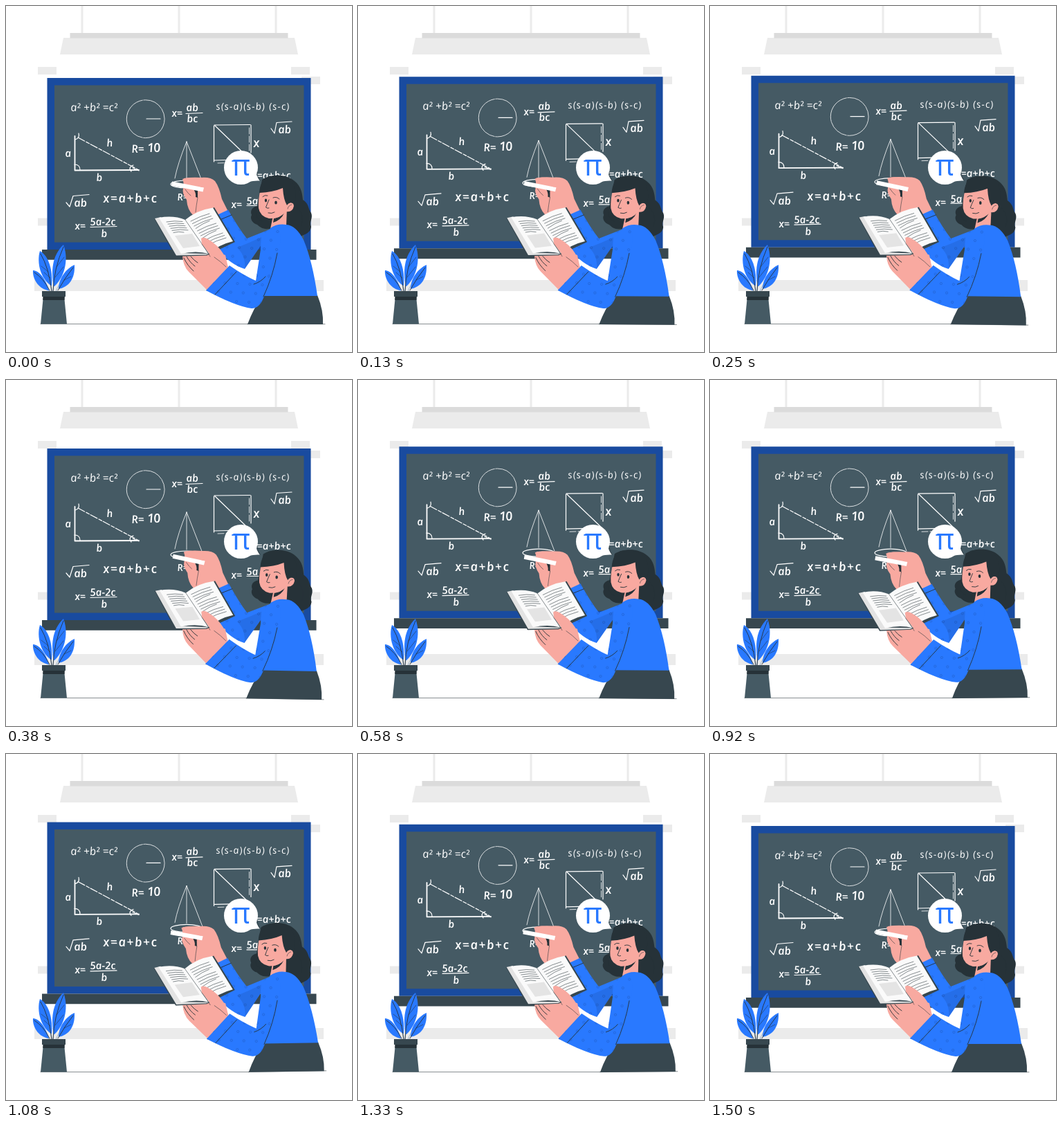
Animation, 500 px wide and 500 px high, one loop 1.54 s. Source, as an HTML page:

```html
<!DOCTYPE html>
<html lang="en">
<head>
<meta charset="utf-8">
<title>Maths lesson</title>
<style>
  html, body { margin: 0; width: 100%; height: 100%; overflow: hidden; background: #fff; }
  svg { display: block; width: 100%; height: 100%; }
  .chalk { fill: none; stroke: #fff; stroke-width: 1.2; stroke-linecap: round; stroke-linejoin: round; }
  .thin { stroke-width: .8; }
  .thick { stroke-width: 1.8; }
  .note { fill: #fff; font-family: "Open Sans", "Noto Sans", sans-serif; font-style: italic; }
  .pi { fill: #2979ff; font: 500 42px "Open Sans", "Noto Sans", sans-serif; text-anchor: middle; }
  .wall { fill: #ebebeb; }
  .blue { fill: #2979ff; }
  .skin { fill: #f8a9a0; }
  .slate { fill: #37474f; }
  .dark { fill: #263238; }
  .ink { fill: none; stroke: #263238; stroke-width: .9; stroke-linecap: round; stroke-linejoin: round; }
  .fine { stroke-width: .55; }
  .stem { fill: none; stroke: #b4c3d2; stroke-width: 1.6; }
</style>
</head>
<body>
<svg viewBox="0 0 500 500">
  <defs>
    <pattern id="dots" width="18" height="26" patternUnits="userSpaceOnUse" patternTransform="rotate(3)">
      <g fill="none" stroke="#1f62d4" stroke-width=".8">
        <circle cx="4" cy="6" r="1.6"/>
        <circle cx="13" cy="19" r="1.6"/>
      </g>
    </pattern>
  </defs>

  <g class="wall">
    <path d="M108.500 0h3v40h-3zM248.500 0h3v40h-3zM388.500 0h3v40h-3z"/>
    <path d="M83 46H417L422 70H78Z"/>
    <path d="M46 88h27v11h-27zM412 88h27v11h-27zM427 102h27v11h-27zM46 306.500h27v11h-27zM427 306.500h27v11h-27z"/>
    <path d="M41 396H459V412H41Z"/>
  </g>
  <path fill="#dbdbdb" d="M92.500 39h315v7.500h-315z"/>

  <g id="board">
    <path fill="#194b9f" d="M59.500 104h381v248h-381z"/>
    <path fill="#455a64" d="M70 114.500h360.500v227h-360.500z"/>
    <path class="slate" d="M52 352h396.500v14.800h-396.500z"/>
    <g class="chalk">
      <circle class="thin" cx="201.700" cy="163.200" r="27.400" stroke-dasharray="46 1.500 30 1"/>
      <path d="M203 163H223"/>
      <path class="thick" d="M99.500 188V237.500L192 237"/>
      <path d="M104 190L190 236" stroke-dasharray="11 2.500 5 2"/>
      <path d="M105 184Q107 191 100 193M99 229Q107 229 107 237M184 230Q176 233 181 239M183 234L192 238"/>
      <path d="M301 172L353 171.500M300.500 173V225M301 223L344 222M302 173L352 221M354 172V212"/>
      <path class="thin" d="M306 227L340 226M351.500 176V210" stroke-dasharray="9 3"/>
      <path class="thin" d="M261 196Q248 228 244 249M261 196V250M261 196Q272 224 284 255"/>
      <ellipse cx="261" cy="257.500" rx="23" ry="5.500"/>
      <path d="M383 177L388 184L391 168.500L413 167M87 284L92 290L97 274.500L120 272.500"/>
      <path d="M260 155.500L284 154.500M122 319.500L160 318.500M348 288.500H372"/>
    </g>
    <g id="notes"></g>
  </g>

  <path class="ink fine" d="M50 459.500H351"/>

  <g id="plant">
    <path class="stem" d="M68 413Q69 398 72 390M66 413Q65 400 60 390M64 413Q58 409 54 404M72 413Q75 404 82 397"/>
    <g class="blue">
      <path d="M69 405C65 384 66 361 83 345C90 363 87 389 70 405Z"/>
      <path d="M65 404C50 394 44 371 49 354C62 361 68 383 66 404Z"/>
      <path d="M62 411C49 410 38 396 39 382C50 383 58 397 62 411Z"/>
      <path d="M76 409C76 394 86 380 99 374C100 394 91 406 76 409Z"/>
    </g>
    <path class="ink" d="M68 412Q69 380 83 348M66 412Q62 378 50 358M63 411Q54 393 41 385M75 411Q85 393 97 378"/>
    <path class="ink fine" d="M71 392L83 377M73 377L84 363M61 384L51 376M64 393L55 385M84 396L94 391"/>
    <path fill="#455a64" d="M54 419H84L88 459.500H50Z"/>
    <path class="dark" d="M53.500 418H85L84.500 425H53.300Z"/>
    <path class="slate" d="M52 412H86V420H52Z"/>
  </g>

  <g id="teacher">
    <path class="ink fine" d="M349 459.700H461"/>

    <!-- writing arm -->
    <path class="blue" id="farArm" d="M302 301L321 294.500Q336 321 348 336L388 320L384 345L369 345L345 380Q325 374 307 353Z"/>
    <path fill="#000" opacity=".09" d="M334 349Q352 342 369 334L368 346L345 380Q347 362 334 349Z"/>
    <path class="ink" d="M309 309L326 302"/>
    <path class="skin" d="M257 249Q268 247 282 248Q296 247 302 253Q308 261 312 279L320 295L305 302L290 305L270 302Q262 294 261 280Q254 270 256 264Z"/>
    <path class="dark" d="M270 263L277 266L277 277L274 276Q275 270 270 263Z"/>
    <path class="ink fine" d="M277 277Q275 288 274 298M259 265Q263 271 267 274"/>
    <path fill="#fff" d="M240 253.500L286 262.500L284.500 268.500L239 259.500Z"/>
    <path class="skin" d="M255 250Q263 247 276 249L285 257L283 262Q270 257 257 256Z"/>

    <!-- hair, neck and face -->
    <path class="dark" d="M370 251C382 243 404 242 417 253C427 261 428 271 429 280C439 287 436 293 441 299C444 307 438 311 441 319C440 329 430 330 426 333C416 336 408 330 402 324L380 322C371 323 366 319 363 316C356 314 352 307 355 302C352 295 357 290 363 289Z"/>
    <path class="skin" d="M387 298L382 322Q394 326 405 318L406 292Z"/>
    <path class="dark" d="M387 307Q397 305 402 299Q398 309 386 313Z"/>
    <path class="skin" d="M368 264Q364 280 365 292Q367 304 380 307Q396 308 404 297Q414 299 416 289Q415 281 406 286L402 258Z"/>
    <path class="dark" d="M366 270Q367 253 378 247Q400 242 413 254Q422 266 417 287Q411 281 406 288Q401 280 400 263Q386 269 366 270Z"/>
    <path class="ink" d="M371 275.500Q374 272.500 378 274M386 277Q391 275 395 279M380 280Q377 287 375.500 291Q378 293 380 292M379 299Q384 300.500 388 298"/>
    <g class="dark">
      <ellipse cx="375.500" cy="281" rx="1.700" ry="2.400"/>
      <ellipse cx="390" cy="284" rx="1.800" ry="2.500"/>
    </g>
    <path class="ink fine" d="M407 293Q408 288 413 287M421 291Q432 302 427 318M362 299Q361 308 370 311"/>

    <!-- body -->
    <path class="slate" d="M371 418H450Q459 440 458 460H349Q357 438 371 418Z"/>
    <path class="blue" d="M382 321Q392 314 405 316Q419 317 430 338Q443 369 450 419H370L368 346Z"/>

    <!-- hand under the book -->
    <path class="skin" d="M255 361Q256 376 264 384L291 411L321 378L317 360L295 352Z"/>
    <path class="ink" d="M257 364Q262 375 271 383M261 362Q266 371 273 376M267 362Q272 368 277 371"/>

    <path class="blue" id="nearArm" d="M323 375Q343 389 361 397L369 345Q378 328 393 320Q401 333 391 366Q385 396 372 422Q366 437 355 437Q332 434 289 411Z"/>
    <path class="ink" d="M302 417L333 384M392 357Q386 390 372 420M358 402Q368 399 375 391"/>

    <!-- book -->
    <path class="slate" d="M214 307L245 362L290 360.500L331 341L301 291L258 309Z"/>
    <path fill="#e3e3e3" d="M215 307L224 305L255 357L293 358L289 359.500L246 360.500Z"/>
    <path fill="#fafafa" d="M221 306Q242 302 259 309Q276 295 299 291.500L328 340Q307 345 293 358Q275 353 253 358Z"/>
    <path fill="#e4e4e4" d="M244 332L269 329L280 347L256 350Z"/>
    <path class="ink fine" d="M259 309L293 358"/>
    <g id="print" class="ink fine"></g>
    <path class="skin" d="M282 336Q285 333 292 337Q306 345 314 358L321 378L300 367Q290 352 283 344Z"/>
    <path class="ink fine" d="M283 344Q289 352 295 362M301 363Q310 369 318 377"/>
  </g>

  <circle cx="339.500" cy="233.500" r="24.500" fill="#fff"/>
  <path fill="#fff" d="M361 239Q362 247 367 252.500Q358 252 351 254Z"/>
  <path class="ink fine" d="M363 240Q363 247 367 252.500"/>
  <text class="pi" x="339.500" y="245">π</text>
</svg>

<script>
const NS = "http://www.w3.org/2000/svg";
const $ = id => document.getElementById(id);

function add(parent, tag, attrs, text) {
  const el = document.createElementNS(NS, tag);
  for (const key in attrs) el.setAttribute(key, attrs[key]);
  if (text) el.textContent = text;
  parent.append(el);
  return el;
}

// text, left, baseline, size, weight, letter spacing
function note(text, x, y, size = 15, weight = 600, gap = 0) {
  add($("notes"), "text", {
    class: "note", transform: `translate(${x} ${y}) skewX(8)`,
    "font-size": size, "font-weight": weight, "letter-spacing": gap
  }, text);
}

note("a² +b² =c²", 94, 152, 16, 500);
note("R=", 182, 212, 16);
note("10", 205, 211, 18, 600, -1);
note("x=", 240, 160);
note("ab", 261, 152);
note("bc", 262, 168);
note("s(s-a)(s-b) (s-c)", 304, 150, 14, 500, 1.2);
note("ab", 394, 184, 16);
note("x", 358, 204, 18);
note("a", 86, 218);
note("h", 146, 203);
note("b", 131, 253);
note("R=", 248, 281, 14);
note("ab", 99, 290, 16);
note("x=a+b+c", 141, 284, 18, 600, 1.6);
note("x=", 100, 323);
note("5a-2c", 122, 317);
note("b", 138, 334);
note("=a+b+c", 363, 250);
note("x=", 326, 292);
note("5a", 348, 287);

// printed lines on both pages
function line(x, y, w, rise) {
  add($("print"), "path", { d: `M${x} ${y}q${w / 2} ${-rise / 2 - 2} ${w} ${-rise}` });
}
for (let i = 0; i < 6; i++) line(232 + i * 2, 312 + i * 3.1, i === 5 ? 15 : 23, 0.5);
for (let i = 0; i < 11; i++) line(267 + i * 2.4, 311 + i * 3.5, i % 4 === 3 ? 20 : 27, 11);

// dotted fabric over both sleeves
for (const id of ["farArm", "nearArm"]) {
  const d = $(id).getAttribute("d");
  $(id).after(add($("teacher"), "path", { d, fill: "url(#dots)" }));
}

// 36 steps of 1/24 s, then a short rest before the loop restarts
const LOOP = 1540, STEP = 1000 / 24, STEPS = 36;
const triangle = p => 1 - Math.abs(1 - 2 * p);
const sway = p => p < 0.25 ? 4 * p : p < 0.75 ? 2 - 4 * p : 4 * p - 4;

function draw(time) {
  const k = Math.min(STEPS, Math.floor((time % LOOP + 5) / STEP));
  const p = k / STEPS;
  $("board").setAttribute("transform", `translate(0 ${-10 * triangle(p)})`);
  $("teacher").setAttribute("transform", `rotate(${sway(p)} 338 352)`);
}

let start;
function tick(now) {
  start ??= now;
  draw(now - start);
  requestAnimationFrame(tick);
}
draw(0);
requestAnimationFrame(tick);
</script>
</body>
</html>
```
